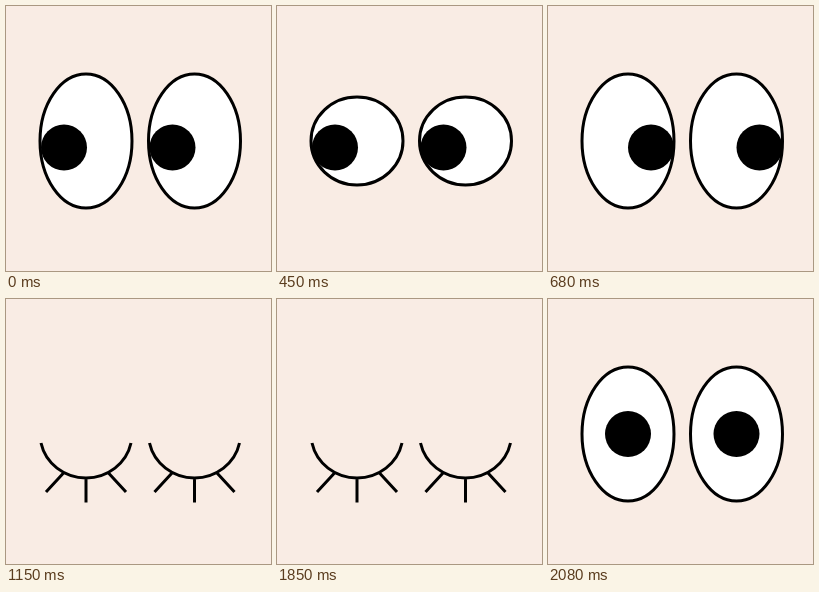
Animation of 265 by 265 pixels, one loop 2.31 s. Source, as an HTML page:

```html
<!DOCTYPE html>
<html lang="en">
<head>
<meta charset="utf-8">
<title>Blinking eyes</title>
<style>
  html, body { margin: 0; width: 100%; height: 100%; overflow: hidden; background: #f9ece4; }
  svg { display: block; width: 100vw; height: 100vh; }
  .line { fill: none; stroke: #000; stroke-width: 3; }
  .white { fill: #fff; stroke: #000; stroke-width: 3; }
</style>
</head>
<body>
<svg viewBox="0 0 265 265">
  <defs>
    <g id="eye">
      <g class="open">
        <ellipse class="white" rx="46" ry="67"/>
        <circle class="pupil" r="23"/>
      </g>
      <path class="line lid" d="M-45 9A46 44 0 0 0 45 9M0 44V68.500M-22.500 39L-40 58M22.500 39L40 58"/>
    </g>
  </defs>
  <g id="eyes"></g>
</svg>
<script>
const LOOP = 2310;
const TALL = 67, ROUND = 44, SHUT = 0;
const LEFT = [-22, 6.5], RIGHT = [23, 6.5], AHEAD = [0, 0];

// start time, lid height, gaze
const poses = [
  [0, TALL, LEFT],
  [450, ROUND, LEFT],
  [510, SHUT, AHEAD],
  [620, ROUND, RIGHT],
  [680, TALL, RIGHT],
  [1150, SHUT, AHEAD],
  [1300, TALL, AHEAD],
  [1850, SHUT, AHEAD],
  [2080, TALL, AHEAD]
];

const root = document.getElementById('eyes');
const model = document.getElementById('eye');

const eyes = [80, 188.5].map(x => {
  const g = model.cloneNode(true);
  g.removeAttribute('id');
  g.setAttribute('transform', `translate(${x} 135)`);
  root.append(g);
  const part = s => g.querySelector(s);
  return { open: part('.open'), ball: part('.white'), pupil: part('.pupil'), lid: part('.lid') };
});

function draw(t) {
  const [, height, [dx, dy]] = poses.findLast(p => p[0] <= t);
  const show = on => on ? 'inline' : 'none';
  for (const { open, ball, pupil, lid } of eyes) {
    open.setAttribute('display', show(height > 0));
    lid.setAttribute('display', show(height === 0));
    ball.setAttribute('ry', height);
    pupil.setAttribute('cx', dx);
    pupil.setAttribute('cy', dy);
  }
}

const start = performance.now();
function tick() {
  draw((performance.now() - start) % LOOP);
  requestAnimationFrame(tick);
}
tick();
</script>
</body>
</html>
```
